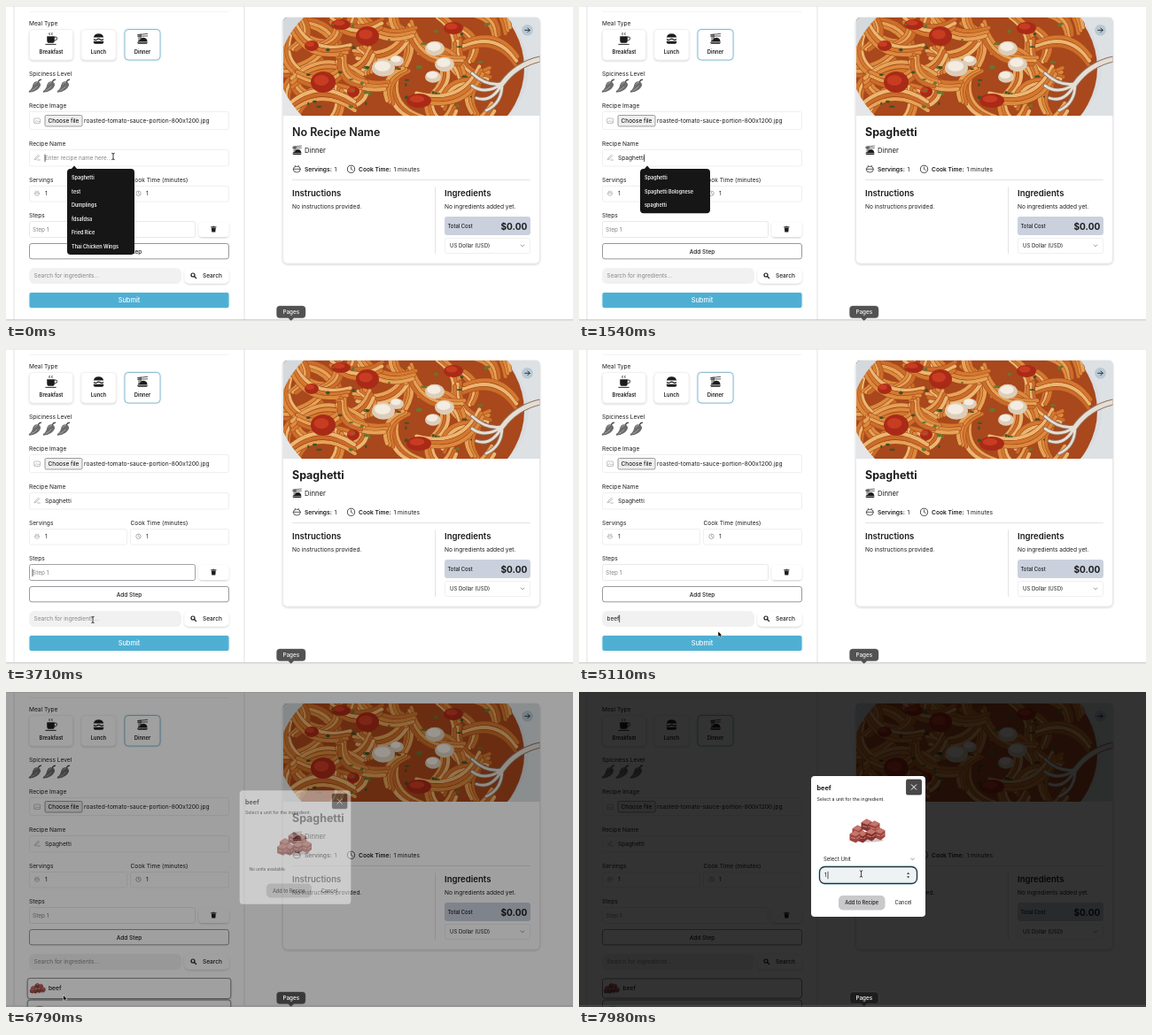
An HTML page for the animation above (8 s loop, 640x356 px).

```html
<!DOCTYPE html>
<html lang="en">
<head>
<meta charset="utf-8">
<title>Recipe form</title>
<style>
html, body { margin: 0; width: 100%; height: 100%; overflow: hidden; background: #fff; }
svg { display: block; width: 100vw; height: 100vh; }
text { font-family: Inter, Roboto, sans-serif; white-space: pre; }
</style>
</head>
<body>
<svg id="stage" viewBox="0 0 640 356">
  <defs>
    <filter id="soft" x="-20%" y="-20%" width="140%" height="150%"><feDropShadow dx="0" dy="1" stdDeviation="1.2" flood-opacity=".2"/></filter>
    <filter id="glow" x="-20%" y="-20%" width="140%" height="140%"><feDropShadow dx="0" dy="0" stdDeviation="1.3" flood-color="#6cc8e8" flood-opacity=".55"/></filter>
    <clipPath id="photo"><path d="M313 124V18q0-5 5-5H597.500q5 0 5 5V124z"/></clipPath>
  </defs>
  <g id="page"></g>
  <g id="live"></g>
  <rect id="shade" width="640" height="356"/>
  <g id="modal"></g>
  <g id="dock"></g>
  <g id="mouse"></g>
</svg>
<script>
const LOOP = 8000, INK = '#1c1c1e', GREY = '#85858a';
const $ = id => document.getElementById(id);
const pen = document.createElement('canvas').getContext('2d');

const rect = (x, y, x2, y2, r, fill, more = '') =>
  `<rect x="${x}" y="${y}" width="${x2 - x}" height="${y2 - y}" rx="${r}" fill="${fill}" ${more}/>`;
const text = (x, y, size, str, weight = 400, fill = INK, anchor = 'start') =>
  `<text x="${x}" y="${y}" font-size="${size}" font-weight="${weight}" fill="${fill}" text-anchor="${anchor}">${str}</text>`;
const line = (d, color = INK, width = .8, more = '') =>
  `<path d="${d}" fill="none" stroke="${color}" stroke-width="${width}" stroke-linecap="round" stroke-linejoin="round" ${more}/>`;
const shape = (d, fill) => `<path d="${d}" fill="${fill}"/>`;
const oval = (x, y, rx, ry, fill, more = '') =>
  `<ellipse cx="${x}" cy="${y}" rx="${rx}" ry="${ry}" fill="${fill}" ${more}/>`;
const group = (x, y, s, inner) => `<g transform="translate(${x} ${y}) scale(${s})">${inner}</g>`;
const stroke = (c, w = .7) => `stroke="${c}" stroke-width="${w}"`;
const field = (x, y, x2, y2) => rect(x, y, x2, y2, 2, '#fff', stroke('#e8e8ea'));
const width = (str, size) => (pen.font = size + 'px Inter, Roboto, sans-serif', pen.measureText(str).width);
const caret = (x, y) => line(`M${x} ${y - 6}v7.600`, '#111', .7);
const chevron = (x, y) => line(`M${x - 1.800} ${y - 1}l1.800 1.800 1.800-1.800`, '#666', .7);
const clock = (x, y, r, c) => oval(x, y, r, r, 'none', stroke(c, .8)) + line(`M${x} ${y - r * .55}v${r * .6}l${r * .45} ${r * .25}`, c, .7);
const bowl = (x, y, r, c) => oval(x, y + .3, r, r * .85, 'none', stroke(c, .7)) +
  line(`M${x - r} ${y}h${2 * r}M${x - r * .4} ${y - r * .8}l-.5-.8M${x + r * .4} ${y - r * .8}l.5-.8`, c, .7);

function seeded(seed) {
  return () => (seed = (seed * 16807) % 2147483647) / 2147483647;
}

// Plate of pasta: bundles of parallel strands, then tomato, cheese, herbs and a fork
function spaghetti() {
  const rnd = seeded(41), tones = ['#dc8a3e', '#e6a357', '#cb6c2a', '#ebb671', '#d4782f'];
  let s = rect(313, 13, 603, 124, 0, '#d9dcde') + oval(445, 70, 140, 108, '#a8481c');
  for (let i = 0; i < 46; i++) {
    const x = 318 + rnd() * 232, y = 8 + rnd() * 116, a = rnd() * 6.28, r = 20 + rnd() * 22;
    const dx = Math.cos(a) * r, dy = Math.sin(a) * r * .7;
    for (let k = 0; k < 3; k++) {
      const ox = x - dy / r * k * 5, oy = y + dx / r * k * 5;
      const d = `M${ox - dx} ${oy - dy}Q${ox - dy} ${oy + dx * .8} ${ox + dx} ${oy + dy}`;
      s += line(d, '#a44a1a', 5) + line(d, tones[(i + k) % 5], 3.900);
    }
  }
  for (const [x, y, rx, ry] of [[408, 34, 13, 11], [358, 86, 14, 12], [378, 21, 11, 6], [345, 45, 8, 6], [505, 25, 11, 7], [466, 107, 14, 8], [392, 97, 7, 6]])
    s += oval(x, y, rx, ry, '#a92a17') + oval(x - 2, y - 2, rx * .6, ry * .5, '#c83c22');
  for (const [x, y, r] of [[426, 70, 13], [484, 48, 11], [495, 66, 11], [441, 62, 8], [482, 80, 9]])
    s += oval(x, y, r, r * .75, '#ddcdb8') + oval(x - 1, y - 2, r * .7, r * .45, '#f4ece0');
  for (let i = 0; i < 40; i++)
    s += oval(340 + rnd() * 205, 18 + rnd() * 98, 1 + rnd() * 2.500, .8 + rnd() * 1.400, i % 2 ? '#3f5226' : '#66752f');
  s += shape('M313 13H336Q322 26 313 46z', '#d4d9dd') + shape('M313 94Q322 112 334 124H313z', '#e4e6e8') +
    shape('M603 13H566Q588 38 590 72Q588 104 566 124H603z', '#dde1e4');
  const tines = 'M560 88Q542 91 526 76M560 88Q541 101 526 90M560 88Q548 110 531 104M560 88Q560 110 542 118';
  const handle = 'M560 88Q576 66 603 60';
  return `<g clip-path="url(#photo)">${s}${line(tines, '#8b7566', 4.500)}${line(handle, '#8b7566', 7)}${line(tines, '#e6ddd3', 2.800)}${line(handle, '#e6ddd3', 5)}</g>`;
}

// Pile of meat cubes, 40 x 28
function beef() {
  return oval(20, 25, 17, 2, 'rgba(60,30,30,.25)') +
    [[8, 15], [18, 8], [27, 10], [13, 21], [33, 18], [23, 19], [5, 21]].map(([x, y], i) =>
      shape(`M${x - 6} ${y - 3}l6-4 6 3v7l-5 4-7-3z`, i % 2 ? '#863330' : '#a0453f') +
      shape(`M${x - 6} ${y - 3}l6-4 6 3-5 3.500z`, '#c4766c') +
      line(`M${x - 4} ${y + 1}l4 1M${x + 2} ${y + 2}l3-2`, '#d9a196', .8)).join('');
}

function chili(x) {
  return group(x, 90, 1,
    shape('M2-4.800Q6.500-4 6 0Q3 7-7 7.800Q-8 6-5.500 5Q-3 2-2.500-1.500Q-1-5 2-4.800z', '#6c6c6e') +
    line('M3.500-4.500Q4.200-6.500 6.500-6.800', '#4b4b4d', 1.400) + line('M-1-1.500Q0-3.500 2-3.600M-4 5.500Q0 4 2 1', '#b4b4b4', .8));
}

const cup = shape('M-5-3H4V2Q4 5 1 5H-2Q-5 5-5 2z', INK) + line('M4-2h1.500q1.500 0 1.500 1.500T5 2H4M-6.500 6.700h12', INK, 1) +
  line('M-2-7q-1 1 0 2.400M1-7q-1 1 0 2.400', INK, .9);
const burger = shape('M-6-1.500Q-5-6 0-6T6-1.500z', INK) + line('M-5.500 .8q1.800 1.300 3.700 0t3.700 0 3.600 0', INK, 1.200) +
  shape('M-6 2.800H6V4Q6 6 4 6H-4Q-6 6-6 4z', INK);
const dinner = shape('M-6.500 4.400H6.500L5 6H-5z', INK) + shape('M-5.800 3.700Q-5 1.700-3 1.700Q-2-1.300 1.300-1.300Q5.600-1 5.900 3.700z', INK) +
  line('M-4.300-5V1.500M-3-5.200V1.200M-1.700-5.300V0', INK, .65) + line('M-5.800-4.600L6-6M-5.800-2.900L6-3.300', INK, .8);
const pencil = line('M32.500 173.500l.6-1.900 3.300-3.200 1.200 1.200-3.300 3.200zM35.500 174h3', '#999', .7);
const trash = shape('M231.800 250.600h5l-.5 5h-4z', INK) + line('M231.500 249.800h5.600M233.600 249.200h1.400', INK, .9);

function meal(x, x2, icon, label, picked) {
  const mid = (x + x2) / 2;
  return rect(x, 26.500, x2, 61, 4, '#fff', picked
    ? stroke('#6a9fba', .7) + ' filter="url(#glow)"' : stroke('#e4e4e6', .5) + ' filter="url(#soft)"') +
    group(mid, 37, .95, icon) + text(mid, 54, 5.800, label, 600, INK, 'middle');
}

function page() {
  const label = (x, y, str) => text(x, y, 6.600, str);
  return rect(0, 0, 640, 356, 0, '#fff') + rect(0, 0, 640, .6, 0, '#e2e2e2') +
    line('M9 0V354M269 0V354', '#dedee0', .9) + line('M27 6.500H251', '#efeff0', .7) +
    label(26, 22, 'Meal Type') + meal(26.500, 75.500, cup, 'Breakfast') + meal(85, 124, burger, 'Lunch') +
    meal(134, 174, dinner, 'Dinner', true) +
    label(26, 78.500, 'Spiciness Level') + [33, 49, 65].map(chili).join('') +
    label(26, 115, 'Recipe Image') + field(26.500, 119.500, 251.500, 139.500) +
    rect(31.700, 127, 38.500, 132.500, .8, 'none', stroke('#999', .6)) + line('M32.500 131.500l1.800-2 1.500 1.200 1-.8 1.300 1.500', '#999', .6) +
    rect(44, 123.500, 86, 136, 1.500, '#efefef', stroke('#767676')) + text(65, 132, 6.500, 'Choose file', 400, '#000', 'middle') +
    text(88, 132, 6.650, 'roasted-tomato-sauce-portion-800x1200.jpg') +
    label(26, 158, 'Recipe Name') + field(26.500, 162.500, 251.500, 181) + pencil +
    label(26, 198.500, 'Servings') + field(26.500, 203.500, 136.500, 221) + bowl(35, 211.800, 2.600, '#aaa') + label(44, 214.300, '1') +
    label(140.500, 198.500, 'Cook Time (minutes)') + field(140.500, 203.500, 251.500, 221) + clock(149.500, 211.800, 2.700, '#999') + label(158, 214.300, '1') +
    label(26, 239, 'Steps') + rect(217.500, 244, 251.500, 261, 4, '#fff', 'filter="url(#soft)"') + trash +
    rect(26.500, 268.500, 251.500, 285.800, 2.500, '#fff', stroke('#6e6e70', .7)) + text(139, 279.600, 6.500, 'Add Step', 500, INK, 'middle') +
    rect(26, 296, 198, 314, 6, '#f1f1f2') +
    rect(201.500, 296.500, 251.500, 313.500, 5, '#fff', 'filter="url(#soft)"') +
    oval(211, 304, 2, 2, 'none', stroke(INK, 1.200)) + line('M212.600 305.600l2 2', INK, 1.300) + text(222, 307.200, 6.500, 'Search', 500) +
    card();
}

function card() {
  return rect(312.500, 13, 602.500, 291, 5, '#fff', stroke('#e0e0e3', .6) + ' filter="url(#soft)"') + spaghetti() +
    oval(588.500, 27.300, 6.300, 6.300, '#b9c8d3') + line('M585.700 27.300h5.500M588.900 25l2.300 2.300-2.300 2.300', '#26333d', 1) +
    group(328.500, 163, .82, dinner) + text(337, 165.700, 7.700, 'Dinner') +
    bowl(328.300, 184.300, 4, INK) + text(337, 186.800, 6.700, 'Servings:', 600) + text(370.500, 186.800, 6.600, '1') +
    clock(389.500, 184.300, 4.100, INK) + text(398, 186.800, 6.650, 'Cook Time:', 600) + text(437.500, 186.800, 6.700, '1 minutes') +
    line('M323.500 196.500H591.500', '#dcdcde', .8) + line('M484.500 205V279.500', '#dcdcde', .8) +
    text(323, 214.500, 9.600, 'Instructions', 600) + text(323, 228.700, 6.600, 'No instructions provided.') +
    text(495, 214.500, 9.600, 'Ingredients', 600) + text(495, 228.700, 6.600, 'No ingredients added yet.') +
    rect(495, 238, 592, 259, 3, '#cad1dd') + text(498.500, 250.800, 5.850, 'Total Cost', 500) +
    text(588.300, 252.500, 10.100, '$0.00', 700, INK, 'end') +
    field(495.500, 262.500, 591.500, 279.500) + text(501, 273.300, 6, 'US Dollar (USD)') + chevron(583, 271);
}

const NAME_KEYS = [420, 680, 930, 1120, 1190, 1260, 1330, 1400, 1470];
const FIND_KEYS = [4520, 4660, 4800, 4930];
const CLICK_STEP = 2480, CLICK_FIND = 4000, RESULTS = 5900, HOVER = 6060, OPEN = 6737, UNITS = 7280, FOCUS = 7860;
const typed = (str, keys, t) => str.slice(0, keys.filter(k => k <= t).length);

function suggestions(items, right) {
  return shape('M73 185l4-4.500 4 4.500z', '#161617') + rect(69, 184, right, 187.500 + items.length * 15.600, 4, '#161617') +
    items.map((s, i) => text(74, 196 + i * 15.550, 5.500, s, 600, '#f2f2f2')).join('');
}

function results(hover) {
  const grow = hover ? 2.300 : 0, edge = stroke('#69696c', .8);
  return rect(26.500 - grow, 348, 251.500 + grow, 372, 3, '#fff', edge + (hover ? ' filter="url(#glow)"' : '')) +
    oval(38, 356.500, 4, 2, '#aaa') +
    rect(26.500 - grow, 324 - grow / 4, 251.500 + grow, 346 + grow / 4, 3, '#fff', edge + (hover ? ' filter="url(#soft)"' : '')) +
    group(28.500 - grow / 2, 328.500, .44, beef()) + text(49.500 - grow / 1.500, 337.300, 6.700, 'beef', 500);
}

function live(t) {
  const name = typed('Spaghetti', NAME_KEYS, t), find = t < RESULTS ? typed('beef', FIND_KEYS, t) : '';
  const onStep = t >= CLICK_STEP && t < CLICK_FIND, onFind = t >= CLICK_FIND && t < 5650;
  let s = text(323, 146.800, 12.450, name || 'No Recipe Name', name ? 700 : 600) +
    (name ? text(44, 174, 6.600, name) : text(44, 174, 6.350, 'Enter recipe name here...', 400, GREY)) +
    rect(26.500, 243.500, 213.500, 261.500, 2, '#fff', stroke(onStep ? '#8a8a8e' : '#e2e2e4', .8)) +
    text(30, 255, 6.500, 'Step 1', 400, GREY) +
    (find ? text(31.500, 307, 6.500, find) : text(31.500, 307, 6.500, 'Search for ingredients...', 400, GREY));
  if (t < CLICK_STEP) s += caret(44 + width(name, 6.600), 174);
  if (onStep) s += caret(30, 255);
  if (onFind) s += caret(31.700 + width(find, 6.500), 307);
  s += t < RESULTS
    ? rect(26.500, 324, 251.500, 341, 2, '#4fafd3', 'filter="url(#glow)"') + text(139, 335.300, 7.400, 'Submit', 500, '#f4fbfe', 'middle')
    : results(t >= HOVER && t < 6830);
  if (t < NAME_KEYS[0]) s += suggestions(['Spaghetti', 'test', 'Dumplings', 'fdsafdsa', 'Fried Rice', 'Thai Chicken Wings'], 145);
  else if (t < 2300) s += suggestions(['Spaghetti', 'Spaghetti Bolognese', 'spaghetti'], 148);
  return s;
}

function modal(t) {
  const ready = t >= UNITS, h = ready ? 159 : 132, top = 174.500 - h / 2, by = top + h - 24;
  const p = 1 - (1 - Math.min(1, Math.max(0, (t - OPEN) / 200))) ** 2;
  $('shade').setAttribute('opacity', .8 * p);
  if (!p) return '';
  let s = rect(262, top, 391, top + h, 4, '#fff') +
    text(268.500, top + 16, 7.300, 'beef', 700) + text(268.500, top + 27.600, 5.250, 'Select a unit for the ingredient.') +
    rect(369.500, top + 4, 386.500, top + 21, 1.500, '#48484a', stroke('#2c2c2e')) +
    line(`M375.200 ${top + 9.700}l5.600 5.600m0-5.600l-5.600 5.600`, '#fff', 1) +
    group(306.500, top + 47.500, 1, beef());
  if (ready) {
    const focus = t >= FOCUS;
    s += text(276, top + 96.200, 6, 'Select Unit') + chevron(376.500, top + 94) +
      rect(271.500, 197.500, 381.500, 216.500, 6, focus ? '#eef2f4' : '#f3f3f4', focus ? stroke('#1f3038', 1.300) + ' filter="url(#glow)"' : '') +
      text(277, 209.300, 6.300, '1');
    if (focus) s += caret(281, 209.300);
    if (t > 7700) s += shape('M370 206l1.600-2.200 1.600 2.200zM370 208.300l1.600 2.200 1.600-2.200z', '#444');
  } else s += text(273, top + 93, 5, 'No units available');
  s += rect(293, by, 345.500, by + 16.500, 5, '#c9c9cb') + text(319.200, by + 10.400, 5.700, 'Add to Recipe', 500, INK, 'middle') +
    text(356.500, by + 10.400, 5.800, 'Cancel');
  const k = .95 + .05 * p;
  return `<g opacity="${p}" transform="translate(326.500 ${174.500 + 2 * (1 - p)}) scale(${k}) translate(-326.500 -174.500)">${s}</g>`;
}

const dock = () => rect(0, 354, 640, 356, 0, 'rgba(120,120,120,.2)') + line('M0 354.300H640', 'rgba(120,120,120,.3)', .6) +
  `<path d="M309 339H334.500Q338 339 338 342.500V349Q338 352.500 334.500 352.500H325L321.700 355.500 318.500 352.500H309Q305.500 352.500 305.500 349V342.500Q305.500 339 309 339z" fill="rgba(22,22,22,.74)" stroke="rgba(90,90,90,.6)" stroke-width=".6"/>` +
  text(321.800, 348.400, 6.300, 'Pages', 500, '#f4f4f4', 'middle');

const PATH = [[0, 121, 170], [1960, 121, 170], [2460, 103, 259], [2800, 103, 259], [3500, 98, 306], [4930, 98, 306],
  [5300, 220, 333], [5580, 226, 306], [5750, 226, 306], [6300, 60, 347.500], [6480, 59, 347.500], [6740, 64.500, 342.500],
  [7050, 64.500, 342.500], [7740, 318.500, 205.500], [8000, 318.500, 205.500]];

function mouse(t) {
  if ((t >= NAME_KEYS[0] && t < 1960) || (t >= FIND_KEYS[0] && t < 4930)) return '';
  const i = PATH.findIndex(p => p[0] > t), [t0, x0, y0] = PATH[i - 1], [t1, x1, y1] = PATH[i];
  const u = (t - t0) / (t1 - t0), e = u * u * (3 - 2 * u), x = x0 + (x1 - x0) * e, y = y0 + (y1 - y0) * e;
  const within = (a, b) => y > a && y < b;
  const typing = t < OPEN
    ? within(162, 181) || within(203, 221) || within(243, 262) || (within(296, 314) && x < 198)
    : x > 271 && x < 382 && within(197, 217);
  const clicked = [CLICK_STEP, CLICK_FIND].some(c => t >= c && t < c + 220);
  const beam = 'M-1.300-3.700Q0-3.700 0-2.600Q0-3.700 1.300-3.700M0-2.600V2.600M-1.300 3.700Q0 3.700 0 2.600Q0 3.700 1.300 3.700';
  const arrow = '<path d="M0 0v6.300l1.500-1.300 1 2.300 1.200-.5-1-2.200h2z" fill="#000" stroke="#fff" stroke-width=".5"/>';
  return group(x, y, 1, (clicked ? oval(0, 0, 7, 7, 'rgba(255,255,255,.5)', stroke('#222', 1)) : '') +
    (typing ? line(beam, '#fff', 1.600) + line(beam, '#111', .8) : arrow));
}

$('page').innerHTML = page();
$('dock').innerHTML = dock();

function draw() {
  const t = performance.now() % LOOP;
  $('live').innerHTML = live(t);
  $('modal').innerHTML = modal(t);
  $('mouse').innerHTML = mouse(t);
  requestAnimationFrame(draw);
}
draw();
</script>
</body>
</html>
```
